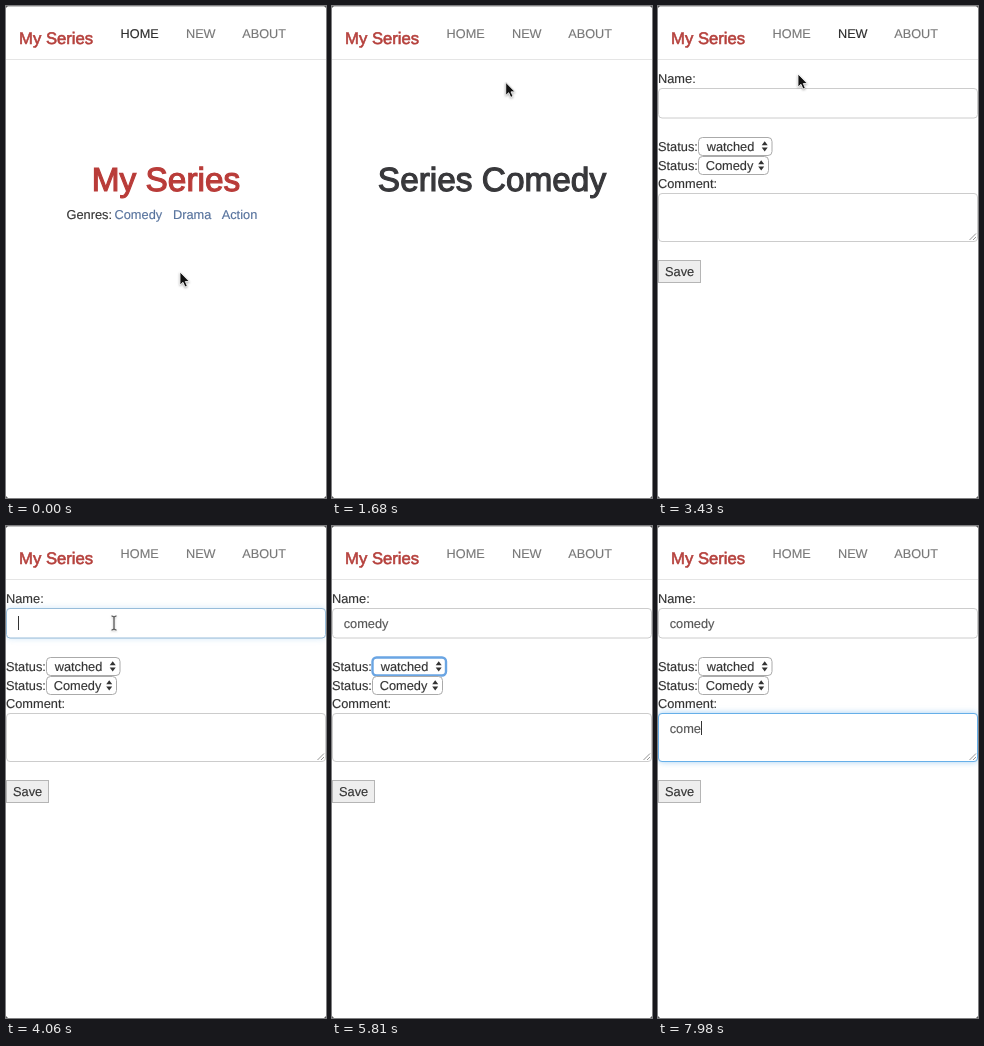
Write an HTML page that moves like this. It is 320 by 492 pixels and loops after 8 s.

```html
<!DOCTYPE html>
<html lang="en">
<head>
<meta charset="utf-8">
<title>Series list demo</title>
<style>
  html, body { margin: 0; width: 100%; height: 100%; overflow: hidden; background: #fff; }
  svg { display: block; width: 320px; height: 492px; }
  text { font: 12.8px "Liberation Sans", Arial, sans-serif; fill: #333; stroke: #333; stroke-width: .15px; white-space: pre; text-rendering: geometricPrecision; }
  .nav { font-size: 12.7px; fill: #777; stroke: #777; }
  .nav.on { fill: #2a2a2a; stroke: #2a2a2a; }
  .brand { font-size: 16.7px; fill: #b5403c; stroke: #b5403c; stroke-width: .6px; }
  .title { font-size: 33.4px; text-anchor: middle; fill: #38383b; stroke: #38383b; stroke-width: 1.2px; }
  .title.red { fill: #b93c39; stroke: #b93c39; }
  .link { fill: #56729d; stroke: #56729d; }
  .link.on { fill: #2c5080; stroke: #2c5080; text-decoration: underline; }
  .typed { fill: #555; stroke: #555; }
  .box { fill: #fff; stroke: #ccc; }
  .select { fill: #fff; stroke: #aaa; }
  .glow { fill: #fff; stroke: #66afe9; filter: drop-shadow(0 0 3px #66afe999); }
  .ring { fill: none; stroke: #6aa5e3; stroke-width: 2.4px; }
  .cursor { filter: drop-shadow(0 1px 1px #0005); }
</style>
</head>
<body>
<svg viewBox="0 0 320 492">
  <rect width="320" height="492" fill="#fff"/>
  <path d="M0 .5H320" stroke="#c4c4c4"/>
  <path d="M0 53.5H320" stroke="#e5e5e5"/>
  <path d="M0 0h2l-2 2zM320 0h-2l2 2zM0 492v-2l2 2zM320 492v-2l-2 2z" fill="#555"/>
  <text class="brand" x="13" y="38">My Series</text>
  <text class="nav" id="navHome" x="114.6" y="31.7">HOME</text>
  <text class="nav" id="navNew" x="180" y="31.7">NEW</text>
  <text class="nav" x="236.3" y="31.7">ABOUT</text>

  <g id="home">
    <text class="title red" x="160" y="184.7">My Series</text>
    <text x="60.500" y="213.3">Genres:</text>
    <text class="link" id="comedyLink" x="108.5" y="213.3">Comedy</text>
    <text class="link" x="167" y="213.3">Drama</text>
    <text class="link" x="215.7" y="213.3">Action</text>
  </g>

  <g id="series">
    <text class="title" x="160" y="184.7">Series Comedy</text>
  </g>

  <g id="form">
    <text x="0" y="77.300">Name:</text>
    <rect class="box" x=".5" y="82.5" width="319" height="29.5" rx="3.5"/>
    <rect class="glow" id="nameGlow" x=".5" y="82.5" width="319" height="29.5" rx="3.5"/>
    <text class="typed" id="nameText" x="11.7" y="101.700"></text>

    <text x="0" y="144.700">Status:</text>
    <rect class="select" x="40.5" y="131.5" width="73.5" height="18" rx="4"/>
    <rect class="ring" id="statusRing" x="40.5" y="131.5" width="73.5" height="18" rx="4"/>
    <text x="48.7" y="144.700">watched</text>
    <path id="arrows" d="M103.7 139.2h6l-3-4zM103.7 141.6h6l-3 4z" fill="#333"/>

    <text x="0" y="163.700">Status:</text>
    <rect class="select" x="40.5" y="150.5" width="70" height="18" rx="4"/>
    <rect class="ring" id="genreRing" x="40.5" y="150.5" width="70" height="18" rx="4"/>
    <text x="47.7" y="163.700">Comedy</text>
    <use href="#arrows" x="-3.5" y="19"/>

    <text x="0" y="182.300">Comment:</text>
    <rect class="box" x=".5" y="187.5" width="319" height="48" rx="3.5"/>
    <rect class="glow" id="commentGlow" x=".5" y="187.5" width="319" height="48" rx="3.5"/>
    <path d="M311.5 234l6.5-6.5M315 234l3-3" stroke="#888" stroke-width=".9"/>
    <text class="typed" id="commentText" x="11.7" y="206.700"></text>

    <path id="caret" d="M.5 0v14" stroke="#333"/>
    <rect x=".5" y="254.5" width="42" height="22" fill="#eee" stroke="#b5b5b5"/>
    <text x="7" y="269.700">Save</text>
  </g>

  <g id="cursor" class="cursor">
    <path id="arrow" d="M0 0V13L3 10.3 5 15 7.3 14 5.3 9.5H9.3Z" fill="#111" stroke="#fff" stroke-width=".8"/>
    <path id="hand" d="M-1.5 1.5Q0-.5 1.5 1.5L2.5 6Q4 4.800 5 6.200 6.500 5.200 7.500 6.800 9.500 6.500 9.500 9L9 13 8 16H1L-3.500 10.500Q-4-8 -4 9.500-3 7.500 0 9.500Z" fill="#fff" stroke="#444"/>
    <path id="beam" d="M-2.5-7Q0-7 0-5.5V5.5Q0 7-2.5 7M2.5-7Q0-7 0-5.5M0 5.5Q0 7 2.5 7" fill="none" stroke="#333"/>
  </g>
</svg>
<script>
const LOOP = 8000, STEP = 70;
const SERIES_AT = 630, FORM_AT = 2660;
const FOCUS = { name: 4060, status: 5740, genre: 6160, comment: 6790 };
const NAME_KEYS = [4690, 4830, 4970, 5180, 5320, 5460];
const COMMENT_KEYS = [7350, 7490, 7630, 7840];

// Pointer stops: time, x, y
const PATH = [
  [0, 174, 266], [420, 133, 206], [980, 133, 206], [2030, 188, 31],
  [3010, 188, 31], [3430, 140, 68], [3850, 108, 97]
];

const $ = id => document.getElementById(id);
const show = (id, on) => { $(id).style.display = on ? "" : "none"; };
const mark = (id, on) => $(id).classList.toggle("on", on);
const clamp = v => Math.max(0, Math.min(1, v));

// Hand outline: fingertip at the origin, thumb on the left
$("hand").setAttribute("d",
  "M-1.5 1.5Q0-.5 1.5 1.5L2.5 6Q4 4.8 5 6.2 6.5 5.2 7.5 6.8 9.5 6.5 9.5 9L8 16H1L-3.5 10.5Q-3.5 7.5 0 9.5Z" +
  "M2.5 6L3 9M5 6.2V9M7.5 6.8V9");

function pointerAt(t) {
  const next = PATH.findIndex(p => p[0] > t);
  if (next < 0) return PATH.at(-1).slice(1);
  const [t0, x0, y0] = PATH[next - 1], [t1, x1, y1] = PATH[next];
  const u = (t - t0) / (t1 - t0), k = u * u * (3 - 2 * u);
  return [x0 + (x1 - x0) * k, y0 + (y1 - y0) * k];
}

function typed(id, keys, t) {
  $(id).textContent = "comedy".slice(0, keys.filter(k => k <= t).length);
}

function focusGlow(id, from, to, t) {
  $(id).style.opacity = clamp((t - from + STEP) / 140) * clamp((to - t + STEP) / 140);
}

function drawCaret(t) {
  const inComment = t >= FOCUS.comment;
  const field = $(inComment ? "commentText" : "nameText");
  show("caret", inComment || (t >= FOCUS.name && t < FOCUS.status));
  const x = 12 + (field.textContent ? Math.round(field.getComputedTextLength()) : 0);
  $("caret").setAttribute("transform", `translate(${x} ${inComment ? 195 : 90})`);
}

function drawPointer(t) {
  const [x, y] = pointerAt(t);
  const onComedy = t < SERIES_AT + STEP && x < 157 && y < 216;
  const onNew = t > SERIES_AT && t < 3150 && x > 178 && y < 46;
  const shape = onComedy || onNew ? "hand" : t >= FORM_AT && y > 82 ? "beam" : "arrow";
  for (const id of ["hand", "beam", "arrow"]) show(id, id === shape);
  show("cursor", t < NAME_KEYS[0]);
  $("cursor").setAttribute("transform", `translate(${x} ${y})`);
  mark("comedyLink", onComedy);
  mark("navNew", onNew || (t >= FORM_AT && t < FOCUS.name));
}

function draw(t) {
  show("home", t < SERIES_AT);
  show("series", t >= SERIES_AT && t < FORM_AT);
  show("form", t >= FORM_AT);
  mark("navHome", t < SERIES_AT);
  typed("nameText", NAME_KEYS, t);
  typed("commentText", COMMENT_KEYS, t);
  focusGlow("nameGlow", FOCUS.name, FOCUS.status, t);
  focusGlow("commentGlow", FOCUS.comment, LOOP * 2, t);
  show("statusRing", t >= FOCUS.status && t < FOCUS.genre);
  show("genreRing", t >= FOCUS.genre && t < FOCUS.comment);
  drawCaret(t);
  drawPointer(t);
}

const start = performance.now();
function tick() {
  const t = (performance.now() - start) % LOOP;
  draw(Math.floor(t / STEP) * STEP);
  requestAnimationFrame(tick);
}
tick();
</script>
</body>
</html>
```
